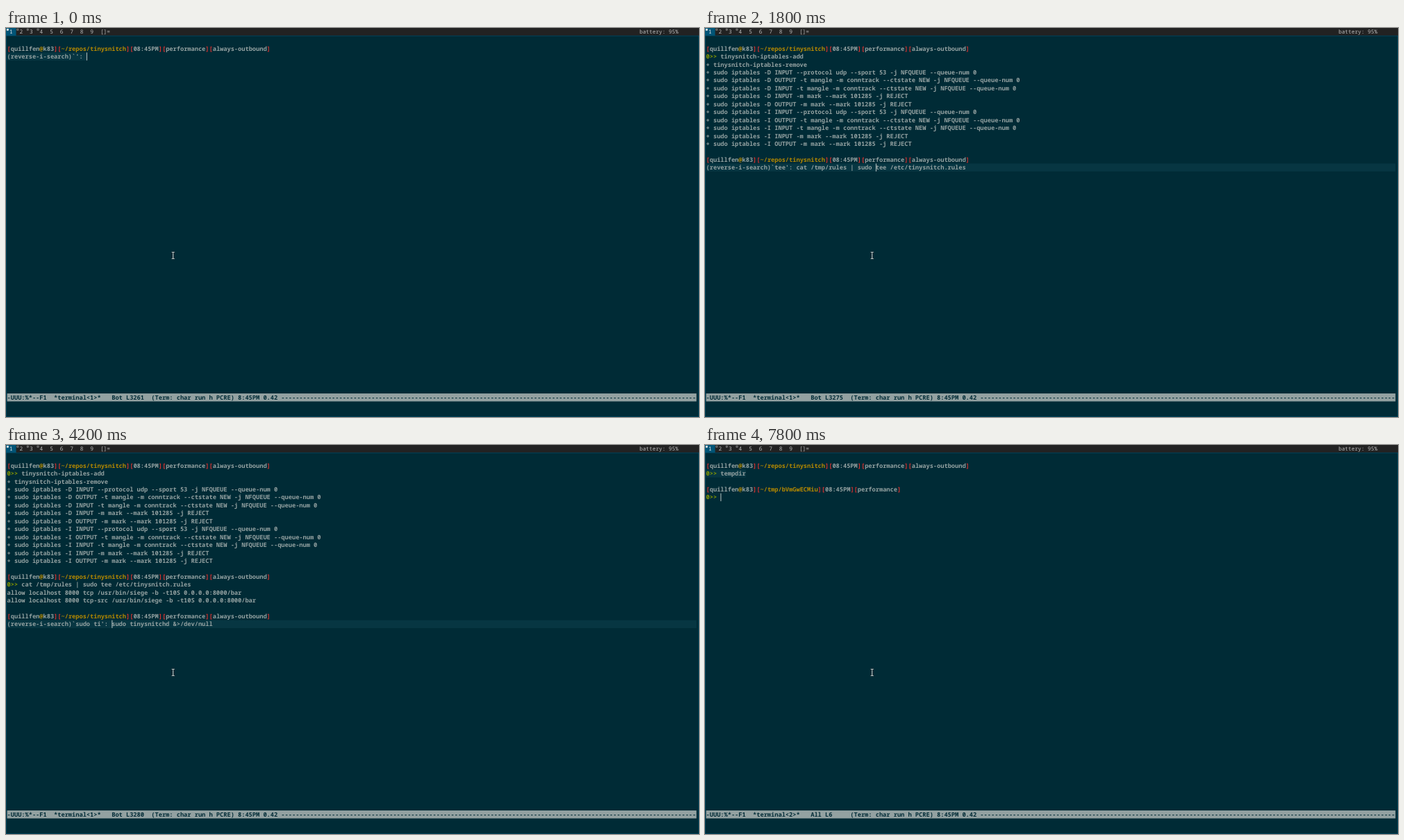
An HTML page that plays this animation: 998x561 px, repeating every 8000 ms.

```html
<!DOCTYPE html>
<html lang="en">
<head>
<meta charset="utf-8">
<title>Terminal session</title>
<style>
  html, body { margin: 0; width: 100%; height: 100%; overflow: hidden; background: #002b36; }
  /* Laid out on a 1920px desktop, shown at 998px. */
  #desktop {
    position: absolute; top: 0; left: 0; width: 1920px; height: 1079.25px;
    transform: scale(.519792); transform-origin: 0 0;
    font: 600 16.667px/22px "Noto Sans Mono", monospace;
    font-variant-ligatures: none; text-rendering: geometricPrecision;
    white-space: pre; color: #93a1a1;
  }
  #desktop div, #pointer { position: absolute; }
  #bar, #window, #screen { top: 0; left: 0; }
  #bar { width: 1920px; height: 21px; background: #222; color: #bbb; font-size: 15px; line-height: 21px; font-weight: 500; }
  #bar > div { top: 0; }
  #bar .tag { width: 28px; height: 21px; text-align: center; }
  #bar .active { background: #057; color: #eee; }
  #bar .mark { left: 2px; top: 2px; width: 5px; height: 5px; box-sizing: border-box; border: 1px solid; }
  #bar .active .mark { background: #eee; }
  #window { top: 21px; width: 1920px; height: 1058.25px; box-sizing: border-box; border: 1px solid #057; }
  .row { left: 3px; width: 1910px; height: 22px; }
  .row span { display: inline-block; height: 22px; vertical-align: top; }
  .lit { background: #073642; }
  #cursor { width: 2px; height: 22px; background: #b5c0c0; }
  #status { top: 1014px; overflow: hidden; background: #93a1a1; color: #002b36; }
  b { font-weight: 700; color: #dc322f; }
  i { font-style: normal; color: #b58900; }
  u { text-decoration: none; color: #859900; }
  #pointer { left: 456px; top: 620px; }
</style>
</head>
<body>
<div id="desktop">
  <div id="bar"></div>
  <div id="window"></div>
  <div id="screen"></div>
  <div id="cursor"></div>
  <div id="status" class="row"></div>
  <svg id="pointer" width="14" height="22" fill="none">
    <path d="M3 2H6L7 3L8 2H11M7 3V19M3 20H6L7 19L8 20H11" stroke="#00161c" stroke-width="4"/>
    <path d="M3 2H6L7 3L8 2H11M7 3V19M3 20H6L7 19L8 20H11" stroke="#d5dcdc" stroke-width="2"/>
  </svg>
</div>
<script>
const LOOP = 8000, CELL = 10, LINE = 22, LEFT = 3, TOP = 46;
const el = id => document.getElementById(id);
const escapeText = s => s.replace(/&/g, '&amp;').replace(/</g, '&lt;').replace(/>/g, '&gt;');

const bracket = s => `<b>[</b>${s}<b>]</b>`;
const prompt = (path, ...tags) =>
  ['quillfen<i>@</i>k83', `<i>${path}</i>`, '08:45PM', ...tags].map(bracket).join('');
const repoPrompt = prompt('~/repos/tinysnitch', 'performance', 'always-outbound');
const shell = (command = '') => `<u>0&gt;&gt;</u> ${escapeText(command)}`;
const searchPrefix = query => `(reverse-i-search)\`${query}': `;

const addCmd = 'tinysnitch-iptables-add';
const teeCmd = 'cat /tmp/rules | sudo tee /etc/tinysnitch.rules';
const daemonCmd = 'sudo tinysnitchd &>/dev/null';

const ruleChange = flag => [
  `${flag} INPUT --protocol udp --sport 53 -j NFQUEUE --queue-num 0`,
  `${flag} OUTPUT -t mangle -m conntrack --ctstate NEW -j NFQUEUE --queue-num 0`,
  `${flag} INPUT -t mangle -m conntrack --ctstate NEW -j NFQUEUE --queue-num 0`,
  `${flag} INPUT -m mark --mark 101285 -j REJECT`,
  `${flag} OUTPUT -m mark --mark 101285 -j REJECT`,
].map(rule => '+ sudo iptables ' + rule);

const start = [repoPrompt];
const added = [...start, shell(addCmd), '+ tinysnitch-iptables-remove',
  ...ruleChange('-D'), ...ruleChange('-I'), '', repoPrompt];
const written = [...added, shell(teeCmd),
  'allow localhost 8000 tcp /usr/bin/siege -b -t10S 0.0.0.0:8000/bar',
  'allow localhost 8000 tcp-src /usr/bin/siege -b -t10S 0.0.0.0:8000/bar',
  '', repoPrompt];

// A view: lines, cursor column on the last line, lit row, and whether it is lit to the edge.
const view = (time, where, lines, column, litRow = -1, wide = true) =>
  ({ time, where, lines, column, litRow, wide });

const search = (time, where, above, query, match = '') => {
  const prefix = searchPrefix(query);
  const column = prefix.length + Math.max(0, match.lastIndexOf(query));
  return view(time, where, [...above, escapeText(prefix + match)], column, above.length, match !== '');
};
const typing = (time, where, above, text) =>
  view(time, where, [...above, shell(text)], 4 + text.length, above.length, false);

const first = '1>*   Bot L', second = '2>*   All L';
const views = [
  search(0, first + 3261, start, ''),
  search(400, first + 3261, start, 'ad', addCmd),
  search(600, first + 3261, start, 'add', addCmd),
  view(1000, first + 3275, [...added, shell()], 4, 1),
  search(1400, first + 3275, added, ''),
  search(1600, first + 3275, added, 't', addCmd),
  search(1800, first + 3275, added, 'tee', teeCmd),
  view(2400, first + 3280, [...written, shell()], 4, added.length),
  search(3600, first + 3280, written, ''),
  search(3800, first + 3280, written, 's', teeCmd),
  search(4000, first + 3280, written, 'sudo ', teeCmd),
  search(4200, first + 3280, written, 'sudo ti', daemonCmd),
  search(4400, first + 3280, written, 'sudo tin', daemonCmd),
  view(5200, first + 3281, [...written, shell(daemonCmd), ''], 0, written.length),
  view(6400, second + 3, [...start, shell()], 4),
  typing(7400, second + 3, start, 'tem'),
  typing(7600, second + 3, start, 'tempdir'),
  view(7800, second + 6, [...start, shell('tempdir'), '',
    prompt('~/tmp/bVmGwECMiu', 'performance'), shell()], 4, 1, false),
];

function drawBar() {
  const tags = Array.from({ length: 9 }, (_, k) =>
    `<div class="tag${k ? '' : ' active'}" style="left:${k * 28}px">` +
    `${k < 4 ? '<div class="mark"></div>' : ''}${k + 1}</div>`);
  el('bar').innerHTML = tags.join('') +
    '<div style="left:261.5px">[]=</div><div style="left:1755px">battery: 95%</div>';
}

function drawView({ where, lines, column, litRow, wide }) {
  el('screen').innerHTML = lines.map((line, row) => {
    const lit = row === litRow;
    return `<div class="row${lit && wide ? ' lit' : ''}" style="top:${TOP + row * LINE}px">` +
      `<span${lit && !wide ? ' class="lit"' : ''}>${line}</span></div>`;
  }).join('');
  el('cursor').style.left = LEFT + column * CELL + 'px';
  el('cursor').style.top = TOP + (lines.length - 1) * LINE + 'px';
  const status = ('-UUU:%*--F1  *terminal<' + where).padEnd(40) + '(Term: char run h PCRE) 8:45PM 0.42 ';
  el('status').textContent = status.padEnd(191, '-');
}

let shown;
function frame() {
  const time = performance.now() % LOOP;
  const current = views.findLast(v => v.time <= time);
  if (current !== shown) drawView(shown = current);
  requestAnimationFrame(frame);
}

drawBar();
frame();
</script>
</body>
</html>
```
